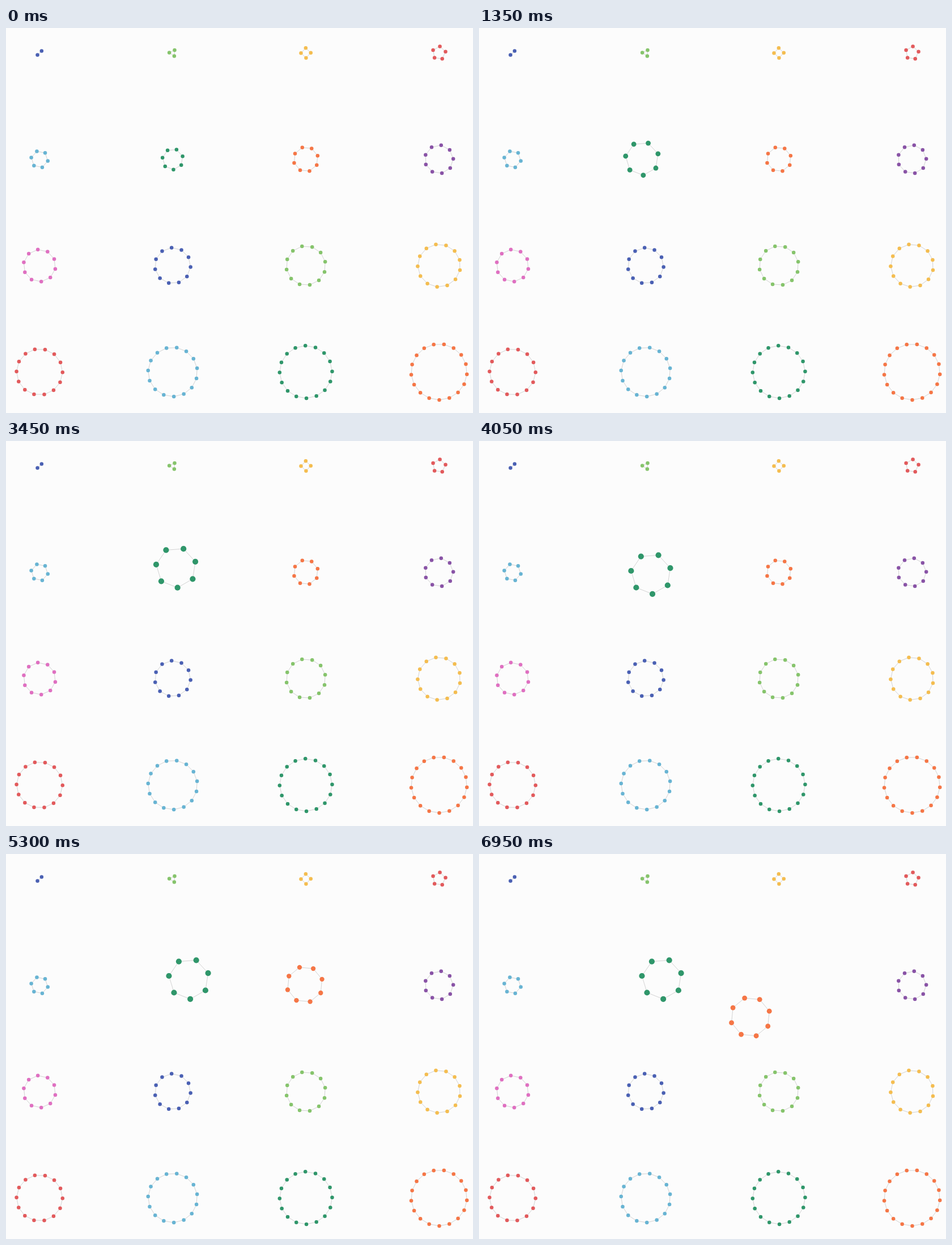
Animation of 824 by 679 pixels, one loop 8 s. Source, as an HTML page with a canvas:

```html
<!DOCTYPE html>
<html lang="en">
<head>
<meta charset="utf-8">
<title>Ring graphs</title>
<style>
html, body { margin: 0; width: 100%; height: 100%; overflow: hidden; background: #fcfcfc; }
canvas { display: block; }
</style>
</head>
<body>
<canvas id="stage" width="824" height="679"></canvas>
<script>
const W = 824, H = 679, LOOP = 8000, STEP = 50;
const NODE = 3.25, NODE_ZOOM = 0.6;
const WHEEL = 1.1, WHEEL_GAP = 120;
const COLS = 4, TURN = 2 * Math.PI;
const ctx = document.getElementById('stage').getContext('2d');

const colors = ['#4a60b3', '#86c46c', '#f4bd50', '#e25a5c', '#68b4d3',
  '#2f966a', '#f57646', '#8953a6', '#df70c1'];

// How far each ring is turned, as a share of one node gap
const turns = [.76, .53, .98, .85, .19, .67, .62, .96,
  .33, .14, .62, .44, .04, .64, .95, .23];

// Springs stretch with the ring size until they level off
const gap = n => Math.max(10, 18.08 - 0.0044 * (15 - n) ** 3);

const rings = turns.map((turn, i) => {
  const n = i + 2;
  return {
    n,
    radius: gap(n) / (2 * Math.sin(Math.PI / n)),
    angle: turn * TURN / n,
    x: 59.2 + 234.97 * (i % COLS),
    y: 44 + 187.53 * Math.floor(i / COLS),
    color: colors[i % colors.length]
  };
});

// Wheel zoom about a point near the centre, then a drag through [time, x, y]
rings[5].move = {
  start: 850, clicks: 7, pivot: [10.5, 1.8], drag: 1900,
  stops: [[3150, 300.1, 223.2], [3450, 300.1, 223.2], [4050, 303.5, 234.4], [4500, 322.6, 220.4]]
};
rings[6].move = {
  start: 4850, clicks: 5, pivot: [4, 3], drag: 5400,
  stops: [[5850, 462.9, 271.1], [6950, 478.9, 287.4]]
};

const clamp = (v, lo, hi) => Math.min(hi, Math.max(lo, v));
const ease = p => p * p * (3 - 2 * p);

function pose({ x, y, move }, t) {
  if (!move) return [x, y, 1];
  const clicks = clamp(Math.floor((t - move.start) / WHEEL_GAP) + 1, 0, move.clicks);
  const zoom = WHEEL ** clicks;
  x -= move.pivot[0] * (zoom - 1);
  y -= move.pivot[1] * (zoom - 1);
  let from = move.drag;
  for (const [to, tx, ty] of move.stops) {
    const p = ease(clamp((t - from) / (to - from), 0, 1));
    x += (tx - x) * p;
    y += (ty - y) * p;
    from = to;
  }
  return [x, y, zoom];
}

function drawRing(ring, [cx, cy, zoom]) {
  const pts = Array.from({ length: ring.n }, (_, k) => {
    const a = ring.angle + k * TURN / ring.n;
    return [cx + ring.radius * zoom * Math.cos(a), cy + ring.radius * zoom * Math.sin(a)];
  });
  ctx.beginPath();
  pts.forEach(p => ctx.lineTo(...p));
  ctx.closePath();
  ctx.stroke();

  const r = NODE * (1 + (zoom - 1) * NODE_ZOOM);
  ctx.fillStyle = ring.color;
  for (const [x, y] of pts) {
    ctx.beginPath();
    ctx.arc(x, y, r, 0, TURN);
    ctx.fill();
  }
}

function draw(t) {
  ctx.fillStyle = '#fcfcfc';
  ctx.fillRect(0, 0, W, H);
  ctx.strokeStyle = '#d3d3d3';
  ctx.lineWidth = 1;
  rings.forEach(ring => drawRing(ring, pose(ring, t)));
}

let start;
function frame() {
  const now = performance.now();
  start ??= now;
  const t = (now - start) % LOOP;
  draw(Math.floor(t / STEP) * STEP);
  requestAnimationFrame(frame);
}
frame();
</script>
</body>
</html>
```
